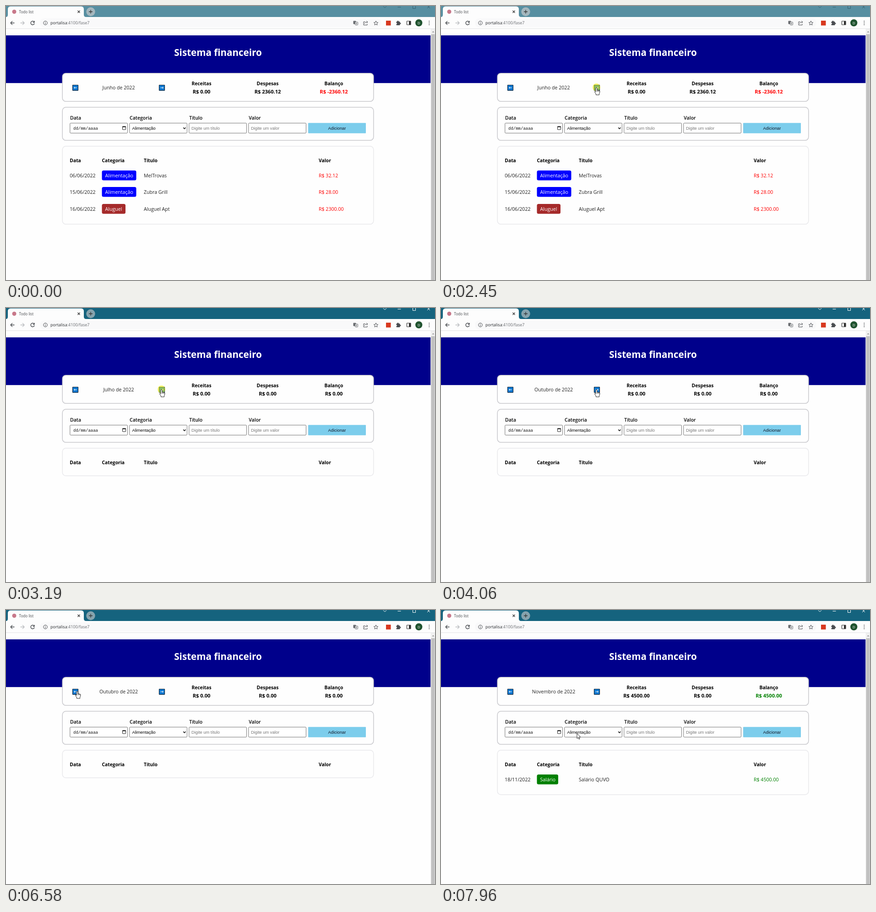
An HTML page with a canvas that plays this animation: 937x598 px, repeating every 8 s.

```html
<!DOCTYPE html>
<html lang="pt-BR">
<head>
<meta charset="utf-8">
<title>Sistema financeiro</title>
<style>
html, body { margin: 0; width: 100%; height: 100%; overflow: hidden; background: #fefefe; }
canvas { display: block; }
</style>
</head>
<body>
<canvas id="stage" width="937" height="598"></canvas>
<script>
const ctx = document.getElementById('stage').getContext('2d');
const LOOP = 8000;
const UI = '"Open Sans", "Noto Sans", sans-serif';
const BODY = '10.6px ' + UI;
const HEAD = 'bold 10.3px ' + UI;
const LABEL = '600 10.5px ' + UI;
const MONEY = 'bold 11.1px ' + UI;
const CONTROL = '9.3px "Liberation Sans", Arial, sans-serif';
const MONO = '9px "Liberation Mono", monospace';
const INK = '#222', ICON = '#4a4d51';

const FOOD = { name: 'Alimentação', color: '#0000ff', width: 75 };
const RENT = { name: 'Aluguel', color: '#a52a2a', width: 51.5 };
const SALARY = { name: 'Salário', color: '#008000', width: 46.5 };

const EMPTY = { income: 0, expense: 0, rows: [] };
const JUNE = {
  income: 0, expense: 2360.12,
  rows: [
    ['06/06/2022', FOOD, 'MelTrovas', 32.12],
    ['15/06/2022', FOOD, 'Zubra Grill', 28],
    ['16/06/2022', RENT, 'Aluguel Apt', 2300]
  ]
};
const NOVEMBER = {
  income: 4500, expense: 0,
  rows: [['18/11/2022', SALARY, 'Salário QUVO', 4500]]
};

const months = [
  [0, 'Junho', JUNE], [2520, 'Julho', EMPTY], [3320, 'Agosto', EMPTY],
  [3790, 'Setembro', EMPTY], [4060, 'Outubro', EMPTY], [4610, 'Novembro', NOVEMBER],
  [5980, 'Outubro', EMPTY], [7690, 'Novembro', NOVEMBER]
];
const clicks = [
  [2450, 2580], [3190, 3320], [3720, 3860], [3930, 4060],
  [4540, 4680], [5910, 6070], [7530, 7690]
];
// Pointer path: time, x, y
const path = [
  [790, 652, 571], [930, 420, 500], [1070, 180, 400], [1200, 82, 300], [1340, 160, 225],
  [1480, 239, 202], [1550, 248, 197], [1900, 310, 188], [2250, 339.5, 178],
  [4680, 339.5, 178], [4960, 245, 190], [5230, 149.5, 181], [5300, 149, 179],
  [5440, 141, 179], [5580, 148, 177], [6510, 148, 177], [6580, 155.5, 177],
  [6900, 225, 226], [7120, 290, 215], [7330, 337.5, 176], [7690, 337.5, 176], [7960, 297, 269]
];
const STEP = 69;

const ARROW = new Path2D('M0 0V11.5L2.6 9.2L4.4 13L6 12.3L4.3 8.6H7.8Z');
const HAND = new Path2D('M-1.5 1Q0 -1 1.5 1V6L3 5.6L5 6.2L7 7Q7.5 7.5 7.3 10L6 13.5V16H-1V14L-4 9.5Q-4 8 -2.8 8L-1.5 9.5Z');
const STAR = new Path2D('M0 -4.6L1.3 -1.5L4.6 -1.2L2.1 1L2.9 4.2L0 2.5L-2.9 4.2L-2.1 1L-4.6 -1.2L-1.3 -1.5Z');
const TAB = new Path2D('M0 24Q4 24 4 19V7Q4 1 10 1H164Q170 1 170 7V19Q170 24 175 24Z');

function text(s, x, y, font, color = '#000', align = 'left') {
  ctx.font = font;
  ctx.fillStyle = color;
  ctx.textAlign = align;
  ctx.fillText(s, x, y);
}

function rect(x, y, w, h, color) {
  ctx.fillStyle = color;
  ctx.fillRect(x, y, w, h);
}

function paint(fill, border, width) {
  if (fill) { ctx.fillStyle = fill; ctx.fill(); }
  if (border) { ctx.strokeStyle = border; ctx.lineWidth = width; ctx.stroke(); }
}

function box(x, y, w, h, r, fill, border, width = 1) {
  ctx.beginPath();
  ctx.roundRect(x, y, w, h, r);
  paint(fill, border, width);
}

function disc(x, y, r, fill, border, width = 1) {
  ctx.beginPath();
  ctx.arc(x, y, r, 0, Math.PI * 2);
  paint(fill, border, width);
}

// Strokes a path placed at x, y
function stroke(d, x, y, color = ICON, width = 1.2) {
  ctx.save();
  ctx.translate(x, y);
  ctx.strokeStyle = color;
  ctx.lineWidth = width;
  ctx.stroke(typeof d === 'string' ? new Path2D(d) : d);
  ctx.restore();
}

function mix(a, b, k) {
  return 'rgb(' + a.map((v, i) => Math.round(v + (b[i] - v) * k)) + ')';
}

function money(v) {
  return 'R$ ' + v.toFixed(2);
}

function drawBrowser(focus) {
  rect(0, 0, 937, 24, mix([87, 143, 161], [21, 99, 126], focus));
  const control = mix([55, 98, 113], [255, 255, 255], focus);
  stroke('M-3.5 -1L0 2.5L3.5 -1', 827.5, 1.5, control, 1);
  stroke('M-3.5 0H3.5', 859, 2.5, control, 1);
  stroke('M-3 -4V2.5H3V-4', 891.5, 3, control, 1);
  stroke('M-3 -3L3 3M3 -3L-3 3', 923, 2, control, 1);

  ctx.fillStyle = '#fdfdfd';
  ctx.fill(TAB);
  disc(18, 12.5, 4.5, '#c8788a');
  text('Todo list', 28.5, 15.5, '8.1px ' + UI, '#45484c');
  stroke('M-2.5 -2.5L2.5 2.5M2.5 -2.5L-2.5 2.5', 159, 12.5, '#333', 1.2);
  disc(185, 12.5, 9.7, mix([164, 183, 190], [134, 163, 174], focus));
  stroke('M-4 0H4M0 -4V4', 185, 12.5, '#333', 1.3);

  rect(0, 24, 937, 25, '#fdfdfd');
  rect(0, 49, 937, 1, '#e3e4e6');
  box(74, 27, 746, 19.5, 9.7, '#f9f9fa');
  stroke('M4.5 0H-4M0 -4L-4 0L0 4', 14, 37, ICON, 1.3);
  stroke('M-4.5 0H4M0 -4L4 0L0 4', 36, 37, '#b9bcbf', 1.3);
  stroke('M3.3 -2.4A4 4 0 1 0 4 1M4 -4.4V-1.2H.8', 58, 37, ICON, 1.4);
  disc(86, 37, 4.2, null, ICON);
  stroke('M0 -2.4V-1.2M0 -.3V2.4', 86, 37, ICON, 1.1);
  text('portalisa', 97, 40, '9px ' + UI, '#25282b');
  const host = ctx.measureText('portalisa').width;
  text(':4100/fase7', 97 + host, 40, '9px ' + UI, '#6a6d71');

  box(758.5, 32.5, 6, 7, 1, '#6a6d71');
  box(762.5, 35, 6, 6.5, 1, '#fff', '#6a6d71');
  stroke('M-1.5 -1H1.5M0 -2V-1L-1.5 1.5M-1 0L1.5 1.5', 765.5, 38.5, ICON, .7);
  stroke('M-1 -2.5H-4.5V4.5H3.5V2M-2.5 2Q-2 -2 4 -2M2 -4.5L4.5 -2L2 .5', 785.5, 37, ICON, 1);
  stroke(STAR, 808, 37.3, ICON, 1);
  rect(830, 32, 10.5, 10.5, '#d8381f');
  box(852.5, 34, 8, 8, 1, ICON);
  disc(856, 33.6, 1.6, ICON);
  disc(861, 38, 1.6, ICON);
  disc(852.8, 38.2, 1.2, '#fdfdfd');
  box(875.5, 33, 8.5, 8, .5, null, '#333', 1.2);
  rect(880, 33, 4, 8, '#333');
  disc(901.7, 36.8, 7.7, '#20532f');
  text('D', 901.7, 39.5, '7.5px ' + UI, '#fff', 'center');
  for (const y of [33.3, 37, 40.7]) disc(924.3, y, 1, ICON);
}

function drawScrollbar() {
  rect(927.5, 50, 9.5, 548, '#f1f1f1');
  rect(928.5, 61.5, 8, 537, '#c1c1c1');
  ctx.fillStyle = '#8a8a8a';
  ctx.fill(new Path2D('M930.5 57.5L933 55L935.5 57.5Z'));
}

function card(y, h, border) {
  box(123.2, y, 679.6, h, 7.5, '#fefefe', border, 1.5);
}

function arrowButton(x, dir) {
  box(x - 6, 172.5, 12, 11.8, .5, '#0d78d2', '#172b3d', 1.2);
  stroke(`M${-3 * dir} 0H${3 * dir}M${dir} -1.8L${3 * dir} 0L${dir} 1.8`, x, 178.4, '#fff', 1);
}

function drawSummary(month, data) {
  card(146.7, 61.6, '#c9c9cd');
  arrowButton(151.5, -1);
  arrowButton(340.5, 1);
  text(month + ' de 2022', 246, 182, BODY, INK, 'center');
  const balance = data.income - data.expense;
  const tint = balance > 0 ? '#008000' : balance < 0 ? '#f00' : '#000';
  [['Receitas', data.income, '#000'], ['Despesas', data.expense, '#000'], ['Balanço', balance, tint]]
    .forEach(([name, value, color], i) => {
      const x = 427 + i * 144.5;
      text(name, x, 173, HEAD, '#000', 'center');
      text(money(value), x, 191, MONEY, color, 'center');
    });
}

function drawForm() {
  card(221, 72.3, '#c9c9cd');
  ['Data', 'Categoria', 'Título', 'Valor'].forEach((name, i) => {
    const x = 140 + i * 130.1;
    text(name, x, 248.3, LABEL);
    box(Math.round(x) - .2, 255.6, 125.6, 21.8, 1.5, '#fff', '#767676');
  });
  text('dd/mm/aaaa', 147, 270, MONO, '#111');
  box(254.5, 263, 7, 6.8, .5, null, '#222', 1);
  rect(254.5, 262.5, 7, 2, '#222');
  text('Alimentação', 275.5, 270, CONTROL, '#000');
  stroke('M-2.6 -1.3L0 1.3L2.6 -1.3', 389.8, 266.7, '#111', 1.5);
  text('Digite um título', 405, 270, CONTROL, '#757575');
  text('Digite um valor', 535, 270, CONTROL, '#757575');
  box(660, 255.3, 126, 22.5, 1, '#7ccdec');
  text('Adicionar', 723, 270, CONTROL, '#101828', 'center');
}

function drawTable(rows) {
  card(306, 60.2 + rows.length * 36.7, '#e9e9ec');
  text('Data', 139.3, 340.5, HEAD);
  text('Categoria', 209.5, 340.5, HEAD);
  text('Título', 301, 340.5, HEAD);
  text('Valor', 683, 340.5, HEAD);
  rows.forEach(([date, kind, title, value], i) => {
    const y = 373.8 + i * 36.6;
    text(date, 139.3, y, BODY, INK);
    box(209.5, Math.round(y - 15), kind.width, 21.4, 3.5, kind.color);
    text(kind.name, 216.5, y, BODY, '#fff');
    text(title, 301, y, BODY, INK);
    text(money(value), 683, y, BODY, kind === SALARY ? '#008000' : '#f00');
  });
}

function pointerAt(t) {
  const i = path.findLastIndex(p => p[0] <= t);
  if (i < 0) return null;
  const [t0, x0, y0] = path[i];
  const [t1, x1, y1] = path[i + 1] || path[i];
  const span = Math.max(1, t1 - t0);
  const k = Math.min(1, Math.floor((t - t0) / STEP) * STEP / span);
  return [x0 + (x1 - x0) * k, y0 + (y1 - y0) * k];
}

function drawPointer(t) {
  const pos = pointerAt(t);
  if (!pos) return;
  const [x, y] = pos;
  if (clicks.some(([on, off]) => t >= on && t < off)) {
    disc(x, y - .5, 8.5, 'rgba(245,245,0,.53)');
  }
  const overButton = y > 171 && y < 186 && [151.5, 340.5].some(c => Math.abs(x - c) < 12);
  const shape = overButton ? HAND : ARROW;
  ctx.save();
  ctx.translate(x, y);
  ctx.fillStyle = '#fff';
  ctx.fill(shape);
  ctx.restore();
  stroke(shape, x, y, '#111', .9);
  if (overButton) stroke('M1.5 6V9M3.5 6V9M5.5 6.5V9', x, y, '#111', .7);
}

function draw(t) {
  const [, month, data] = months.findLast(m => m[0] <= t);
  const focus = Math.min(1, Math.max(0, Math.floor((t - 2450) / 65) / 4));
  rect(0, 0, 937, 598, '#fefefe');
  drawBrowser(focus);
  rect(0, 64.1, 927.5, 104.1, '#00008b');
  text('Sistema financeiro', 463, 109, 'bold 20.6px ' + UI, '#fff', 'center');
  drawSummary(month, data);
  drawForm();
  drawTable(data.rows);
  drawScrollbar();
  drawPointer(t);
}

const start = performance.now();
function tick() {
  draw((performance.now() - start) % LOOP);
  requestAnimationFrame(tick);
}
tick();
</script>
</body>
</html>
```
